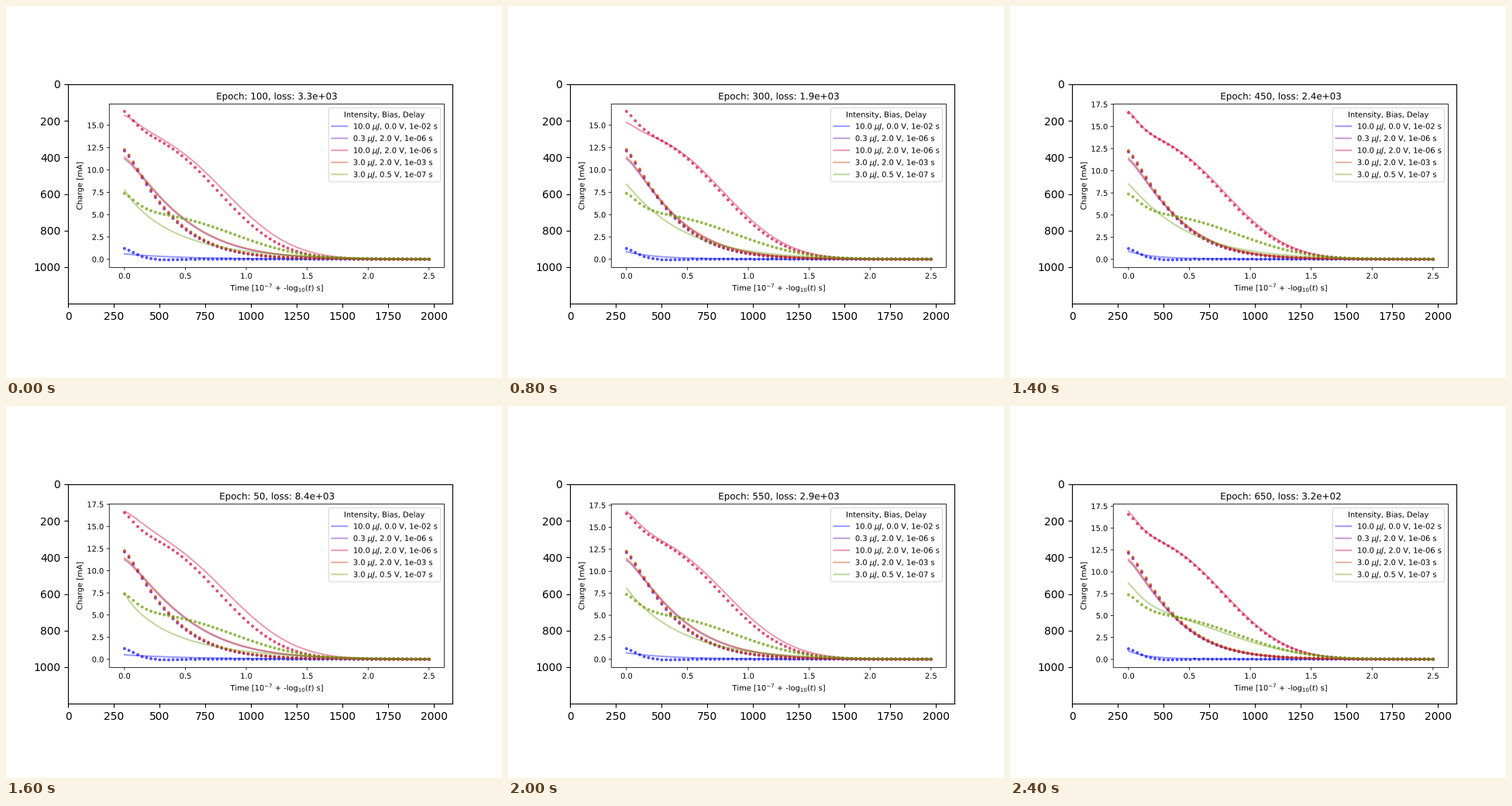
A matplotlib script for the animation above (2600 ms loop, 640 by 480 pixels).

```python
import numpy as np
import matplotlib.pyplot as plt
from matplotlib import patheffects
from matplotlib.animation import FuncAnimation
from matplotlib.patches import FancyBboxPatch, Rectangle

# The chart is laid out in the pixels of a 7 x 4 inch picture at 300 dpi.
WIDTH, HEIGHT = 2100, 1200
PT = 300 / 72
SCALE = 496 / WIDTH * 300 / 100
LEFT, RIGHT, TOP, BOTTOM = 225, 2055, 108.5, 1001.5
LOWEST = -0.08

# Epochs play in the alphabetical order of their names.
EPOCHS = sorted(range(50, 651, 50), key=str)
LABELS = ["10.0 $\\mu J$, 0.0 V, 1e-02 s", "0.3 $\\mu J$, 2.0 V, 1e-06 s",
          "10.0 $\\mu J$, 2.0 V, 1e-06 s", "3.0 $\\mu J$, 2.0 V, 1e-03 s",
          "3.0 $\\mu J$, 0.5 V, 1e-07 s"]
COLORS = [plt.get_cmap("brg")(i / 5) for i in range(5)]

t = np.linspace(0, 2.5, 70)


def decay(height, tau, power=1.0):
    return height * np.exp(-(t / tau) ** power)


def loss(epoch):
    return np.interp(epoch, [50, 100, 200, 300, 400, 550, 650],
                     [8400, 3300, 2800, 1900, 2100, 2900, 320])


def model(epoch):
    """Fitted curves: they lag behind the data less as training goes on."""
    lag = .42 * np.exp(-epoch / 220) + .15 * np.exp(-((epoch - 550) / 70) ** 2)
    peak = np.interp(epoch, [50, 100, 200, 300, 400, 450, 650],
                     [16.7, 16.1, 16.45, 15.3, 15.5, 16.7, 16.9])
    settled = np.clip((epoch - 550) / 100, 0, 1)
    plateau = 13.85
    middle = decay(11.25, .41 * (1 + lag), 1.25)
    early = decay(8.8 - 3.9 * lag, .5 - .25 * lag, 1.13 - .8 * lag)
    late = decay(3.2, .15, 1.2) + decay(5.5, 1, 2.1)
    return [decay(.92 - 1.5 * lag, .1 + 1.3 * lag) + decay(.09, .8),
            middle,
            decay(peak - plateau, .12 + .9 * lag ** 2, 1.35)
            + decay(plateau, .945 * (1 + .25 * lag), 2.5),
            middle + decay(.2, 1),
            (1 - settled) * early + settled * late]


rng = np.random.default_rng(4)
MEASURED = [
    decay(1.2, .118, 1.4) - .1 * np.exp(-((t - .35) / .15) ** 2)
    + rng.normal(.02, .015, t.size),
    decay(12.1, .406, 1.22) + .02,
    decay(2.75, .13, 1.3) + decay(13.8, .945, 2.5),
    decay(12.25, .414, 1.22) + .02,
    decay(2.2, .14, 1.4) + decay(5.15, 1.08, 2.6) + .02,
]

fig = plt.figure(figsize=(6.4, 4.8), dpi=100)
ax = fig.add_subplot()


def to_x(time):
    return LEFT + (time + .125) / 2.75 * (RIGHT - LEFT)


def line(x, y, width=.8, **style):
    style = {"color": "black", "solid_capstyle": "butt", "zorder": 3, **style}
    return ax.plot(x, y, lw=width * SCALE, snap=False, **style)[0]


def label(x, y, text, size=10, ha="center", **style):
    # Drawing the glyphs as outlines keeps them at fractional positions.
    return ax.text(x, y, text, size=size * SCALE, ha=ha, va="baseline",
                   zorder=6, path_effects=[patheffects.Normal()], **style)


curves, dots = [], []
for color in COLORS:
    curves.append(line(to_x(t), 0 * t, 2, color=color, alpha=.4, zorder=2,
                       solid_capstyle="projecting"))
    dots.append(ax.scatter(to_x(t), 0 * t, s=np.full(t.size, (3 * SCALE) ** 2),
                           color=color, alpha=.6, lw=SCALE, zorder=2))

ax.add_patch(Rectangle((LEFT, TOP), RIGHT - LEFT, BOTTOM - TOP, fill=False,
                       lw=.8 * SCALE, snap=False, zorder=3))
for time in np.arange(0, 2.6, .5):
    line([to_x(time)] * 2, [BOTTOM, BOTTOM + 3.5 * PT])
    label(to_x(time), BOTTOM + 61, f"{time:.1f}")
label(886, 1128, "Time [10$^{-7}$ + -log$_{10}(t)$ s]", ha="left")
label(77, (TOP + BOTTOM) / 2, "Charge [mA]", rotation=90,
      rotation_mode="anchor")
title = label((LEFT + RIGHT) / 2, TOP - 6 * PT, "", 12.08)

charges = np.arange(0, 17.6, 2.5)
ticks = [line([LEFT - 3.5 * PT, LEFT], [0, 0]) for _ in charges]
tick_labels = [label(LEFT - 7 * PT, 0, f"{c:.1f}", ha="right") for c in charges]

# Legend
box_left, box_right, box_top, box_bottom = 1424, 2034, 129.5, 534
ax.add_patch(FancyBboxPatch(
    (box_left, box_top), box_right - box_left, box_bottom - box_top,
    boxstyle=f"round,pad=0,rounding_size={2 * PT}", fc=(1, 1, 1, .8),
    ec=(.8, .8, .8, .8), lw=SCALE, snap=False, zorder=5))
label((box_left + box_right) / 2, 181, "Intensity, Bias, Delay")
for i, (color, text) in enumerate(zip(COLORS, LABELS)):
    y = 230 + 65.8 * i
    line([box_left + 4 * PT, box_left + 24 * PT], [y, y], 2, color=color,
         alpha=.4, zorder=6, solid_capstyle="projecting")
    label(box_left + 32 * PT, y + 15, text, ha="left")

ax.set(xlim=(-.5, WIDTH - .5), ylim=(HEIGHT - .5, -.5), aspect="equal",
       xticks=range(0, 2001, 250), yticks=range(0, 1001, 200))


def update(frame):
    epoch = EPOCHS[frame]
    fits = model(epoch)
    highest = max(np.max(fits), np.max(MEASURED))
    margin = .05 * (highest - LOWEST)
    low, high = LOWEST - margin, highest + margin

    def to_y(charge):
        return BOTTOM - (charge - low) / (high - low) * (BOTTOM - TOP)

    title.set_text(f"Epoch: {epoch}, loss: {loss(epoch):.1e}")
    for curve, fit, dot, values in zip(curves, fits, dots, MEASURED):
        curve.set_ydata(to_y(fit))
        dot.set_offsets(np.column_stack([to_x(t), to_y(values)]))
    for charge, tick, text in zip(charges, ticks, tick_labels):
        y = to_y(charge)
        tick.set_ydata([y, y])
        text.set_y(y + 15.8)
        tick.set_visible(charge <= high)
        text.set_visible(charge <= high)
    return [title, *curves, *dots, *ticks, *tick_labels]


anim = FuncAnimation(fig, update, frames=len(EPOCHS), interval=200, repeat=True)
plt.show()
```
